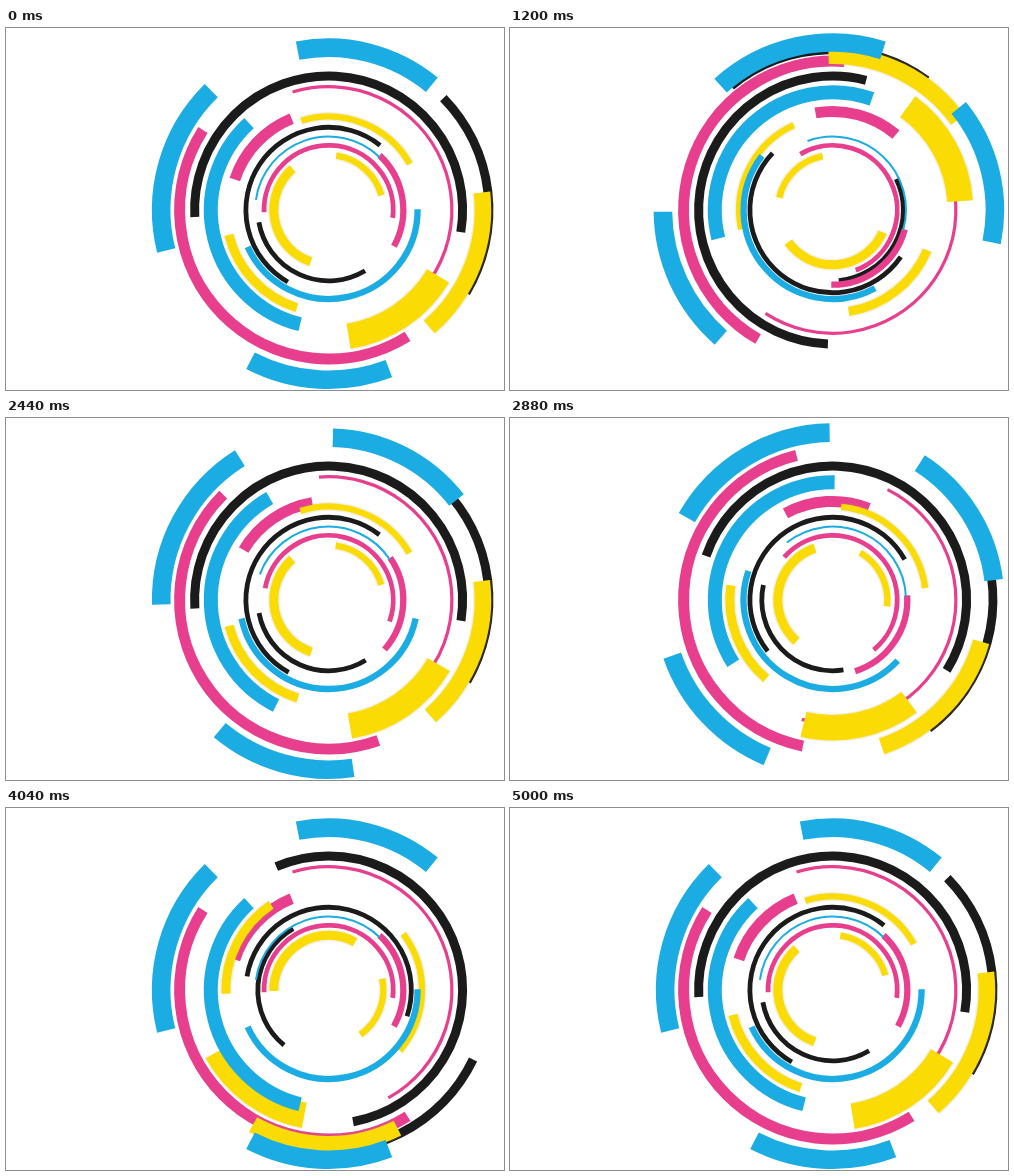
An HTML page for the animation above (5.8 s loop, 498x362 px).

```html
<!DOCTYPE html>
<html lang="en">
<head>
<meta charset="utf-8">
<title>Rotating rings</title>
<style>
  html, body { margin: 0; width: 100%; height: 100%; overflow: hidden; background: #fff; }
  svg { display: block; width: 498px; height: 362px; }
</style>
</head>
<body>
<svg id="stage" viewBox="0 0 498 362" fill="none"></svg>
<script>
const NS = 'http://www.w3.org/2000/svg';
const LOOP = 5800, STEP = 40, FIRST_STEP = 920;
const CX = 322.6, CY = 182;
const HAIR = 2, FINE = 3.2, THIN = 4.8, LIGHT = 6.3, MEDIUM = 9, BOLD = 11, HEAVY = 14, WIDE = 18.6, HUGE = 25.5;

const stage = document.getElementById('stage');

function add(parent, tag, attributes = {}) {
  const node = document.createElementNS(NS, tag);
  for (const name in attributes) node.setAttribute(name, attributes[name]);
  return parent.appendChild(node);
}

function point(radius, degrees) {
  const a = degrees * Math.PI / 180;
  return `${(CX + radius * Math.cos(a)).toFixed(2)} ${(CY + radius * Math.sin(a)).toFixed(2)}`;
}

// A layer turns as one piece; its arcs run clockwise between two angles.
function layer(color, halo = 0) {
  const group = add(stage, 'g', { stroke: color });
  function arc(width, radius, from, to) {
    const large = to - from > 180 ? 1 : 0;
    const d = `M${point(radius, from)}A${radius} ${radius} 0 ${large} 1 ${point(radius, to)}`;
    if (halo) add(group, 'path', { d, 'stroke-width': width + halo, stroke: '#a89a70', 'stroke-opacity': 0.14 });
    add(group, 'path', { d, 'stroke-width': width });
  }
  function turn(angle) {
    group.setAttribute('transform', `rotate(${angle.toFixed(2)} ${CX} ${CY})`);
  }
  return { arc, turn };
}

const black = layer('#1b1b1b');
black.arc(MEDIUM, 134, 177, 369.5);
black.arc(MEDIUM, 160.3, -44.3, 31);
black.arc(THIN, 82.7, 119.5, 308.5);
black.arc(THIN, 70.8, 59, 170);

const pink = layer('#e83e8e');
pink.arc(BOLD, 149, 58, 212.5);
pink.arc(BOLD, 98.6, 198, 248);
pink.arc(FINE, 123.3, 253, 421);
pink.arc(THIN, 64.6, 178, 367);
pink.arc(LIGHT, 74.7, -47, 29);

const yellow = layer('#fbdb04', 3);
yellow.arc(HUGE, 127.8, 31, 81);
yellow.arc(WIDE - 2, 154.3, -6.5, 49.3);
yellow.arc(LIGHT, 93.4, 253, 330.5);
yellow.arc(MEDIUM, 102.8, 108, 166);
yellow.arc(MEDIUM, 54.8, 109, 229);
yellow.arc(LIGHT, 54.8, -82, -15.5);

const cyan = layer('#1cace4');
cyan.arc(WIDE, 162.3, -101, -50.5);
cyan.arc(WIDE, 167.4, 166, 225.5);
cyan.arc(WIDE, 169.7, 69.2, 117.4);
cyan.arc(HEAVY, 117.8, 104, 227.5);
cyan.arc(LIGHT, 89, -0.5, 155.5);
cyan.arc(HAIR, 73.4, 188, 314);

// Cyan and pink swing together, black and yellow against them; rests fill the gaps.
const moves = [
  { start: 880, end: 1200, front: 62, back: -85 },
  { start: 1260, end: 1740, front: 12.5, back: -0.6 },
  { start: 2680, end: 3200, front: 108.5, back: 70 },
  { start: 3320, end: 4000, front: 0, back: 70 },
  { start: 4040, end: 4520, front: 108.5, back: 35 },
  { start: 4520, end: 5000, front: 0, back: 0 }
];

const ease = p => (1 - Math.cos(Math.PI * p)) / 2;
const clamp = p => Math.min(1, Math.max(0, p));

function render(time) {
  const t = Math.floor((time % LOOP) / STEP) * STEP;
  let front = 0, back = 0;
  if (t >= FIRST_STEP) {
    for (const move of moves) {
      const p = ease(clamp((t - move.start) / (move.end - move.start)));
      front += (move.front - front) * p;
      back += (move.back - back) * p;
    }
  }
  cyan.turn(front);
  pink.turn(front);
  black.turn(back);
  yellow.turn(back);
}

const begin = performance.now();
function tick() {
  render(performance.now() - begin);
  requestAnimationFrame(tick);
}
tick();
</script>
</body>
</html>
```
